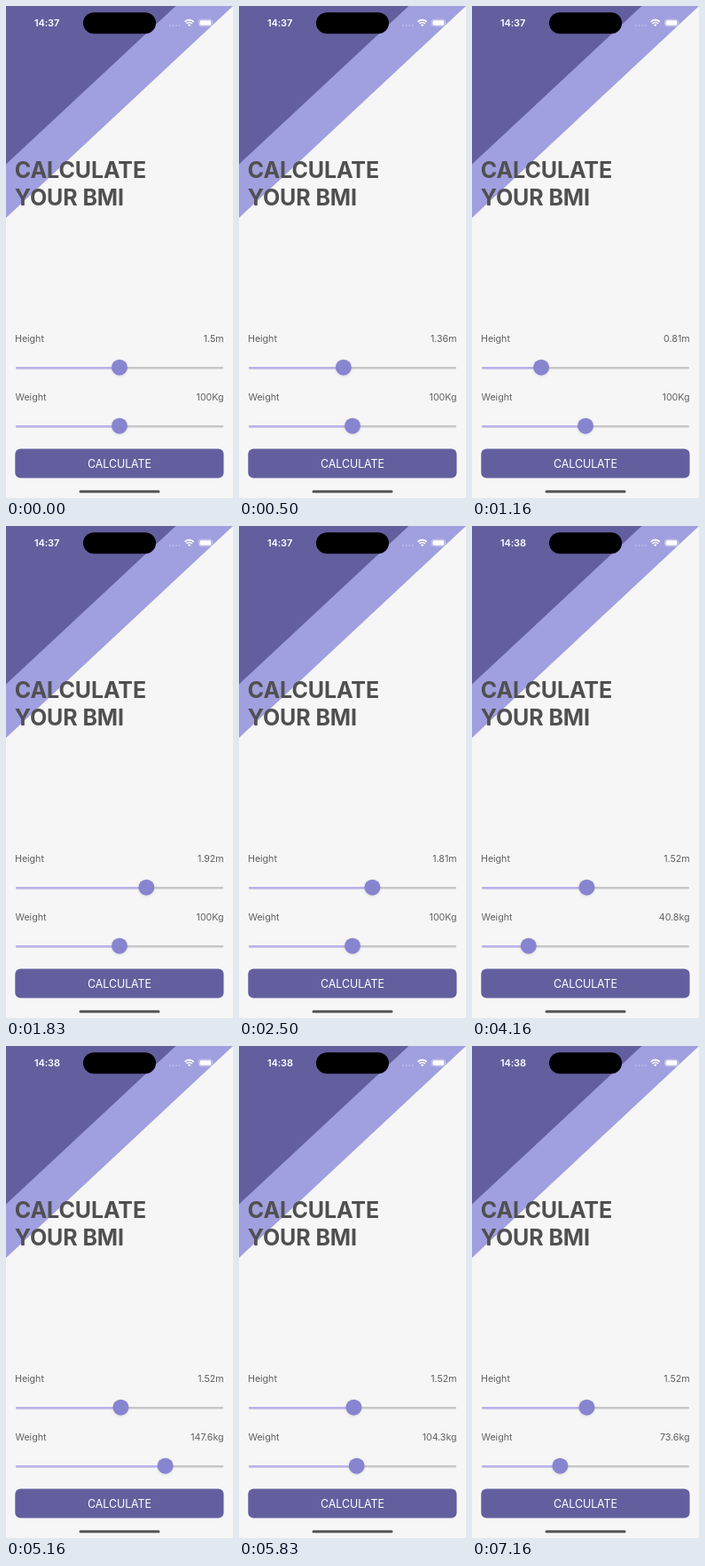
Recreate the animation shown at these times as an HTML page. Size 256 by 555 pixels, loop 8 s.

```html
<!DOCTYPE html>
<html lang="en">
<head>
<meta charset="utf-8">
<title>BMI calculator</title>
<style>
  html, body { margin: 0; width: 100%; height: 100%; overflow: hidden; background: #f6f6f6; }
  svg { display: block; width: 256px; height: 555px; }
  text { font-family: Inter, Roboto, sans-serif; }
  .title { font-size: 25px; font-weight: 700; letter-spacing: -.1px; fill: #505050; }
  .label { font-size: 10.7px; font-weight: 400; letter-spacing: -.05px; fill: #606060; }
  .value { text-anchor: end; }
  .button { font-size: 12.4px; letter-spacing: -.05px; fill: #fff; text-anchor: middle; }
  .clock { font-size: 11px; font-weight: 600; letter-spacing: -.15px; fill: #fff; }
  .rail { stroke: #c7c7ca; stroke-width: 2.6; stroke-linecap: round; }
  .fill { stroke: #bab3ea; stroke-width: 2.6; stroke-linecap: round; }
  .thumb { fill: #8785d0; filter: drop-shadow(0 1.5px 1.5px rgba(0, 0, 0, .11)); }
</style>
</head>
<body>
<svg viewBox="0 0 256 555">
  <rect width="256" height="555" fill="#f6f6f6"/>
  <path d="M0 0H256L0 239Z" fill="#a09fdf"/>
  <path d="M0 0H191.4L0 178.5Z" fill="#635f9f"/>

  <text class="clock" id="clock" x="32" y="23"></text>
  <rect x="87" y="7.2" width="82" height="24" rx="12"/>
  <g fill="#fff">
    <g opacity=".5">
      <circle cx="185" cy="22" r=".8"/><circle cx="188.6" cy="22" r=".8"/>
      <circle cx="192.2" cy="22" r=".8"/><circle cx="195.8" cy="22" r=".8"/>
    </g>
    <path d="M201.6 17.8Q206.7 13.4 211.8 17.8M203.4 19.9Q206.7 17.1 210 19.9" fill="none" stroke="#fff" stroke-width="1.6"/>
    <path d="M204.9 21.2Q206.7 19.8 208.5 21.2L206.7 23.1Z"/>
    <rect x="217.4" y="15.2" width="15" height="7.6" rx="2.4" fill="none" stroke="#fff" stroke-opacity=".5" stroke-width=".8"/>
    <rect x="218.5" y="16.2" width="12.8" height="5.6" rx="1.5"/>
    <path d="M233.4 17.7q1.3 1.3 0 2.6z" opacity=".6"/>
  </g>

  <text class="title" x="9.8" y="194">CALCULATE</text>
  <text class="title" x="9.8" y="225">YOUR BMI</text>

  <g id="height" transform="translate(0 408)">
    <text class="label" x="10" y="-29">Height</text>
    <text class="label value" x="245.5" y="-29"></text>
    <path class="rail" d="M12.3 .3H243.8"/>
    <path class="fill"/>
    <circle class="thumb" cy="-.3" r="9"/>
  </g>
  <g id="weight" transform="translate(0 474)">
    <text class="label" x="10.5" y="-29">Weight</text>
    <text class="label value" x="245.5" y="-29"></text>
    <path class="rail" d="M12.3 .3H243.8"/>
    <path class="fill"/>
    <circle class="thumb" cy="-.3" r="9"/>
  </g>

  <rect x="10.3" y="499.6" width="235.2" height="33" rx="6" fill="#635f9f"/>
  <text class="button" x="128" y="521">CALCULATE</text>
  <rect x="82.5" y="546.3" width="91" height="3" rx="1.5" fill="#555"/>
</svg>
<script>
  const LOOP = 8000;
  const CLOCK_TICK = 4160;

  // Each entry is [start in ms, value]; a value holds until the next one.
  const heights = [[0, 1.5], [500, 1.36], [830, 1.04], [1160, .81], [1830, 1.92],
                   [2160, 1.98], [2500, 1.81], [2830, 1.54], [3160, 1.52]];
  const weights = [[0, 100], [4160, 40.8], [4500, 41.4], [4830, 60.4], [5160, 147.6],
                   [5500, 113.8], [5830, 104.3], [6500, 91.7], [6830, 73.6]];

  const valueAt = (steps, time) => steps.findLast(([start]) => start <= time)[1];

  function setSlider(id, value, max, label) {
    const part = name => document.querySelector(`#${id} .${name}`);
    const x = 19.5 + 217 * value / max;
    part('value').textContent = label;
    part('fill').setAttribute('d', `M12.3 .3H${x}`);
    part('thumb').setAttribute('cx', x);
  }

  function draw(now) {
    const time = now % LOOP;
    const height = valueAt(heights, time);
    const weight = valueAt(weights, time);
    setSlider('height', height, 3, `${height}m`);
    setSlider('weight', weight, 200, weight === 100 ? '100Kg' : `${weight.toFixed(1)}kg`);
    document.getElementById('clock').textContent = time < CLOCK_TICK ? '14:37' : '14:38';
    requestAnimationFrame(draw);
  }
  draw(performance.now());
</script>
</body>
</html>
```
